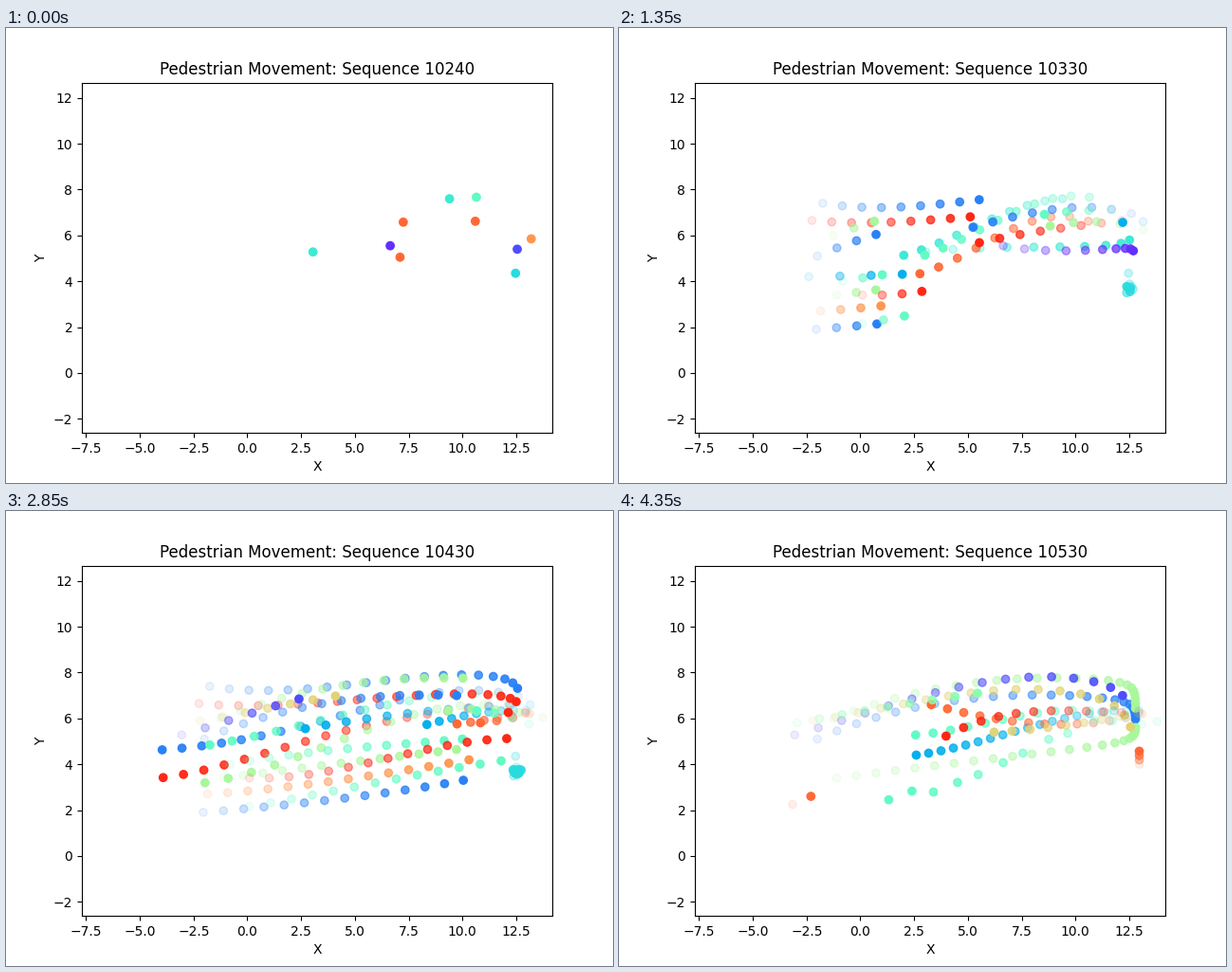
Animation, 640 px wide and 480 px high, one loop 4500 ms. Source, as a matplotlib script:

```python
import numpy as np
import matplotlib.pyplot as plt
from matplotlib.animation import FuncAnimation

FRAMES, INTERVAL = 30, 150
FIRST_ID, ID_STEP = 10240, 10
GATE = 12.8        # crowded exit where lingering walkers slow down
SOFTNESS = 1.2

PURPLE, INDIGO, BLUE, SKY, CYAN, TURQUOISE = .06, .10, .17, .245, .33, .37
AQUA, GREEN, SAND, ORANGE, CORAL, RED = .445, .58, .69, .80, .865, .95

rng = np.random.default_rng(4)
walkers = []


def add(hue, start, x, y):
    walkers.append((start, np.column_stack([x, y]), plt.cm.rainbow(hue)))


def bend(heights, n):
    """Polynomial through evenly spaced heights, sampled at n steps."""
    knots = np.linspace(0, 1, len(heights))
    fit = np.polyfit(knots, heights, len(heights) - 1)
    return np.polyval(fit, np.linspace(0, 1, n))


def walk(hue, start, end, x0, pace, *heights, linger=False):
    """Walk at a steady pace, or slow down softly at the gate."""
    n = end - start + 1
    x = x0 + pace * np.arange(n)
    if linger:
        x = GATE - SOFTNESS * np.log1p(np.exp((GATE - x) / SOFTNESS))
    add(hue, start, x, bend(heights, n))


def stroll(*args):
    walk(*args, linger=True)


def wait(hue, start, end, x, y, drop, spread):
    """Step down to a spot and shuffle around it."""
    k = np.arange(end - start + 1)
    dx, dy = rng.normal(0, spread, (2, len(k)))
    add(hue, start, x + dx, y + drop * np.exp(-1.2 * k) + dy * (k > 0))


# already on the scene
stroll(TURQUOISE, 0, 9, 3.05, 1.26, 5.28, 5.48, 5.52, 5.8)
stroll(PURPLE, 0, 9, 6.65, 1.0, 5.55, 5.33, 5.42, 5.33)
walk(INDIGO, 0, 5, 12.55, .23, 5.4, 5.1)
wait(CYAN, 0, 24, 12.53, 3.68, .67, .09)
walk(TURQUOISE, 0, 12, 9.4, -.82, 7.6, 6.72, 5.37, 5.05)
walk(AQUA, 0, 12, 10.65, -.85, 7.67, 7.05, 5.45, 4.95)
walk(CORAL, 0, 6, 7.25, .97, 6.58, 5.98, 5.8)
walk(CORAL, 0, 6, 7.1, .99, 5.05, 5.0)
walk(CORAL, 0, 12, 10.6, -.87, 6.62, 6.3, 4.62, 4.5)
walk(ORANGE, 0, 1, 13.2, .4, 5.85, 5.8)

# heading left across the whole view
walk(BLUE, 1, 23, 12.6, -.92, 6.95, 6.9, 5.65, 4.75, 4.45)
walk(RED, 2, 23, 12.15, -.945, 6.65, 6.0, 4.87, 3.6, 3.7)
walk(GREEN, 5, 23, 13.15, -1.08, 6.25, 6.3, 4.72, 3.28, 3.42)
walk(AQUA, 6, 23, 11.65, -1.03, 7.1, 6.45, 5.15, 4.55)
walk(SKY, 8, 25, 13.15, -.95, 6.6, 6.25, 5.5, 4.4)

# heading right and slowing down at the gate
stroll(BLUE, 1, 20, -1.75, .91, 7.4, 7.4, 7.9, 7.0)
stroll(RED, 1, 21, -2.25, .92, 6.65, 6.72, 7.07, 6.3)
stroll(BLUE, 6, 29, -2.0, .91, 5.1, 6.85, 6.87, 5.97)
stroll(BLUE, 6, 25, -2.05, .94, 1.9, 2.45, 3.25, 4.4)
stroll(GREEN, 7, 29, -1.25, .95, 6.0, 7.6, 7.6, 6.45)
stroll(AQUA, 7, 25, -.8, .91, 4.0, 4.68, 5.1, 5.7)
stroll(GREEN, 7, 29, -1.1, .91, 3.4, 4.18, 4.9, 5.6)
stroll(SAND, 13, 29, -2.2, 1.05, 5.9, 6.87, 7.23, 5.63)
stroll(INDIGO, 14, 29, -3.05, 1.09, 5.28, 6.85, 7.8, 7.0)

# heading right and leaving
walk(SKY, 6, 15, -2.4, 1.45, 4.2, 4.4, 4.85)
walk(RED, 6, 21, .1, .92, 3.4, 3.87, 4.82, 5.05)
walk(ORANGE, 6, 23, -1.85, .935, 2.7, 3.2, 3.95, 4.78)
walk(AQUA, 7, 21, .1, .975, 2.15, 2.95, 3.75, 4.4)

# coming in from the gate
walk(SKY, 11, 29, 12.95, -.575, 6.35, 6.0, 5.13, 4.4)
walk(CORAL, 14, 26, 12.9, -.63, 6.25, 5.7, 5.6)
walk(SKY, 15, 15, 13.9, 0, 5.2)
walk(GREEN, 15, 20, 13.75, -1.1, 6.05, 6.4, 6.2)
walk(CORAL, 16, 29, 13.1, -.754, 6.2, 5.75, 5.95, 6.6)
walk(AQUA, 16, 29, 13.1, -.81, 5.75, 6.35, 5.85, 5.28)
walk(RED, 18, 29, 12.95, -.815, 6.25, 6.33, 6.18, 5.23)
walk(SAND, 21, 29, 12.9, -.835, 6.25, 5.7, 5.4)
walk(ORANGE, 22, 26, 13.1, -.25, 6.2, 5.6)
walk(AQUA, 23, 29, 13.8, -2.08, 5.87, 5.35, 3.55, 2.45)
walk(AQUA, 24, 29, 13.0, -2.12, 6.2, 5.4, 3.75, 2.83)

# late arrivals on the edges
walk(ORANGE, 20, 28, -3.8, .32, 9.25, 9.25)
walk(.52, 21, 29, -2.95, 1.05, 5.8, 6.5, 7.1)
walk(CORAL, 26, 29, 12.97, 0, 4.0, 4.57)
walk(CORAL, 28, 29, -3.15, .85, 2.25, 2.6)


fig, ax = plt.subplots(figsize=(6.4, 4.8), dpi=100)
ax.set(xlim=(-7.695, 14.18), ylim=(-2.62, 12.67), xlabel="X", ylabel="Y")
title = ax.set_title(f"Pedestrian Movement: Sequence {FIRST_ID}")
dots = ax.scatter([0], [0])


def trail(start, xy, rgba, step):
    """Positions so far, fading in from the oldest to the newest."""
    pts = xy[:step - start + 1]
    if start == 0:
        pts = np.vstack([pts[:1], pts])
    colours = np.tile(rgba, (len(pts), 1))
    colours[:, 3] = np.linspace(.1, 1, len(pts)) if len(pts) > 1 else 1
    return pts, colours


def update(step):
    here = [w for w in walkers if w[0] <= step < w[0] + len(w[1])]
    pts, colours = zip(*(trail(*w, step) for w in here))
    colours = np.vstack(colours)
    dots.set_offsets(np.vstack(pts))
    dots.set_facecolor(colours)
    dots.set_edgecolor(colours)
    title.set_text(f"Pedestrian Movement: Sequence {FIRST_ID + ID_STEP * step}")
    return dots, title


def reset():
    return update(0)


anim = FuncAnimation(fig, update, frames=FRAMES, init_func=reset,
                     interval=INTERVAL, repeat=True, repeat_delay=0)
plt.show()
```
